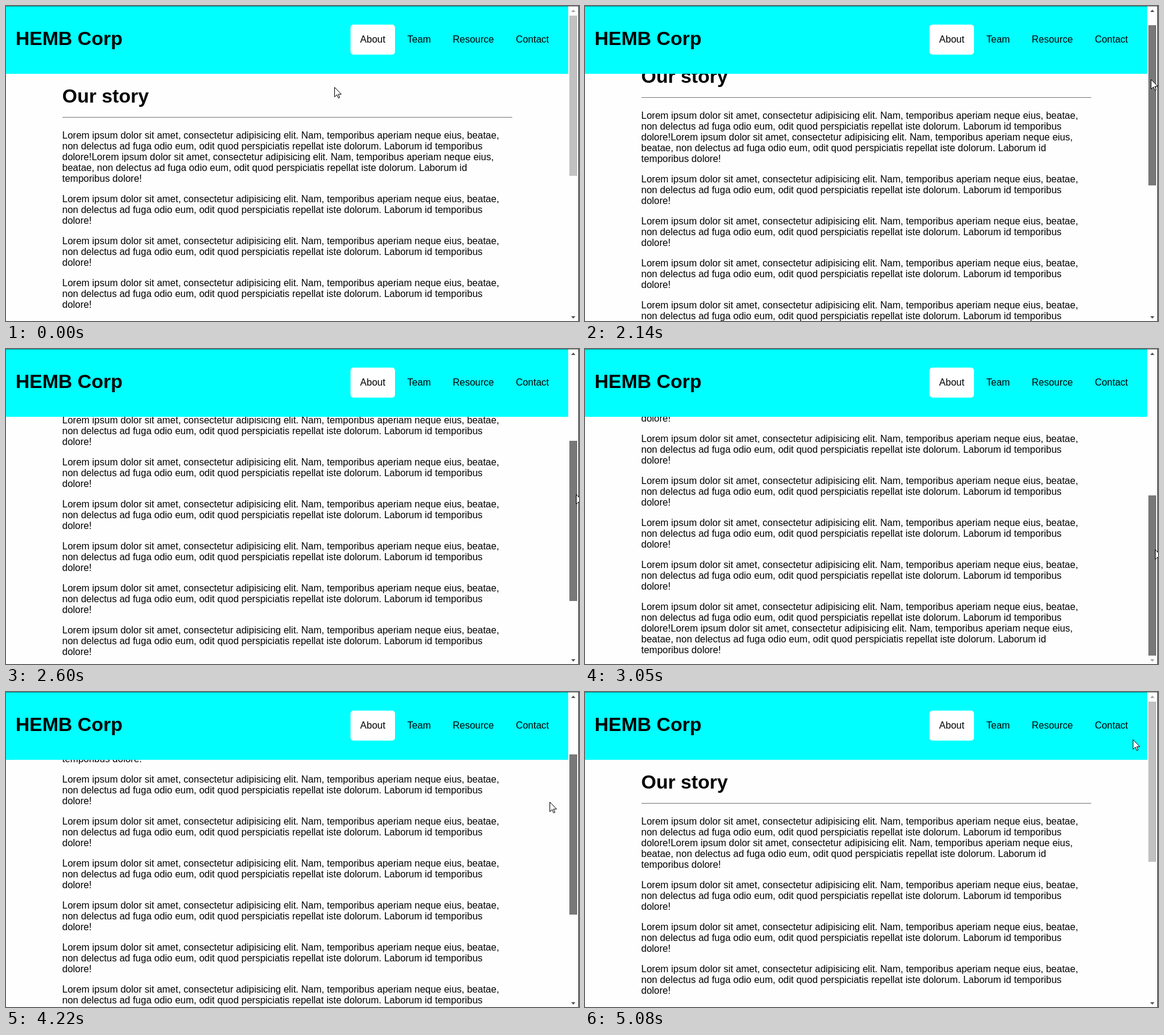
Write an HTML page that moves like this. It is 953 by 525 pixels and loops after 5.7 s.

```html
<!DOCTYPE html>
<html lang="en">
<head>
<meta charset="utf-8">
<title>Fixed header page</title>
<style>
  html, body { margin: 0; width: 100%; height: 100%; overflow: hidden; background: #fefefe; }
  svg { display: block; width: 953px; height: 525px; }
  text { font: 16px "Liberation Sans", Arial, sans-serif; white-space: pre; }
  .title { font-size: 32px; font-weight: bold; }
</style>
</head>
<body>
<svg viewBox="0 0 953 525" xmlns="http://www.w3.org/2000/svg">
  <rect width="953" height="525" fill="#fefefe"/>
  <g id="page">
    <text class="title" x="93.5" y="161">Our story</text>
    <rect x="94" y="185" width="748" height="1" fill="#777"/>
  </g>
  <rect width="935" height="113" fill="#0ff"/>
  <text class="title" x="16" y="65">HEMB Corp</text>
  <rect x="573" y="31" width="74" height="50" rx="5" fill="#fff"/>
  <g id="nav"></g>
  <rect x="935" width="18" height="525" fill="#fefefe"/>
  <path id="up" d="M940 10L943.5 6L947 10Z"/>
  <path id="down" d="M940 517L943.5 521L947 517Z"/>
  <rect id="thumb" x="937" y="16" width="13" height="267"/>
  <rect width="953" height="1" fill="#000" fill-opacity=".45"/>
  <rect x="952" width="1" height="525" fill="#1a1a1a"/>
  <path id="cursor" d="M.5 .5V16.5L4.3 12.9L6.8 18.5L9 17.5L6.6 12.1H11.7Z" fill="#fff" stroke="#000"/>
</svg>
<script>
const LOOP = 5700, STEP = 45, PHASE = 25;
const MAX_SCROLL = 452, MAX_THUMB = 228;
const PRESS = 1590, RELEASE = 4980;
const $ = id => document.getElementById(id);

function addText(parent, x, y, str) {
  const el = document.createElementNS("http://www.w3.org/2000/svg", "text");
  el.setAttribute("x", x);
  el.setAttribute("y", y);
  el.textContent = str;
  parent.append(el);
}

const opening = "Lorem ipsum dolor sit amet, consectetur adipisicing elit. Nam, temporibus aperiam neque eius,";
const middle = "non delectus ad fuga odio eum, odit quod perspiciatis repellat iste dolorum. Laborum id";
const short = [opening + " beatae,", middle + " temporibus", "dolore!"];
const long = [short[0], short[1], "dolore!" + opening, "beatae, " + middle, "temporibus dolore!"];

let baseline = 221;
for (const lines of [long, ...Array(8).fill(short), long]) {
  for (const line of lines) {
    addText($("page"), 93.5, baseline, line);
    baseline += 18;
  }
  baseline += 16;
}

[[589.1, "About"], [667.5, "Team"], [743, "Resource"], [847.9, "Contact"]]
  .forEach(([x, label]) => addText($("nav"), x, 61, label));

const clamp = (v, lo, hi) => Math.min(hi, Math.max(lo, v));

// Progress of a smooth move between two times
function ease(t, from, to) {
  const u = clamp((t - from) / (to - from), 0, 1);
  return u * u * (3 - 2 * u);
}

const approach = t => ease(t, 390, 1130);
const reach = t => ease(t, 1195, 1440);
const dragDown = t => ease(t, 1955, 3084);
const drift = t => ease(t, 3180, 3750);
const dragUp = t => ease(t, 3710, 4580);

const cursorX = t => 546 + 368 * approach(t) + 25 * reach(t) + 9 * ease(t, 1990, 2450)
  - 21 * drift(t) - 23 * ease(t, 3760, 4210) + 7 * ease(t, 4300, 5060);
const cursorY = t => 135 - 34 * approach(t) + 5 * reach(t) + 229 * dragDown(t)
  + 11 * drift(t) - 267 * dragUp(t);

// The downward drag overshoots the end of the page a little
const scrollAt = t => Math.min(MAX_SCROLL, 460 * dragDown(t)) - MAX_SCROLL * dragUp(t);

function draw(time) {
  const t = Math.floor((time - PHASE) / STEP) * STEP + PHASE;
  const scroll = Math.round(scrollAt(t));
  const x = Math.round(cursorX(t)), y = Math.round(cursorY(t));
  const pressed = t >= PRESS && t < RELEASE;
  const hover = t < PRESS && x >= 937;
  const arrow = enabled => enabled ? "#505050" : "#a3a3a3";

  $("page").setAttribute("transform", `translate(0 ${-scroll})`);
  $("thumb").setAttribute("y", 16 + Math.floor(scroll * MAX_THUMB / MAX_SCROLL));
  $("thumb").setAttribute("fill", pressed ? "#787878" : hover ? "#a8a8a8" : "#c1c1c1");
  $("up").setAttribute("fill", arrow(scroll > 0));
  $("down").setAttribute("fill", arrow(scroll < MAX_SCROLL));
  $("cursor").setAttribute("transform", `translate(${x} ${y})`);
}

const start = performance.now();
function tick() {
  draw((performance.now() - start) % LOOP);
  requestAnimationFrame(tick);
}
tick();
</script>
</body>
</html>
```
